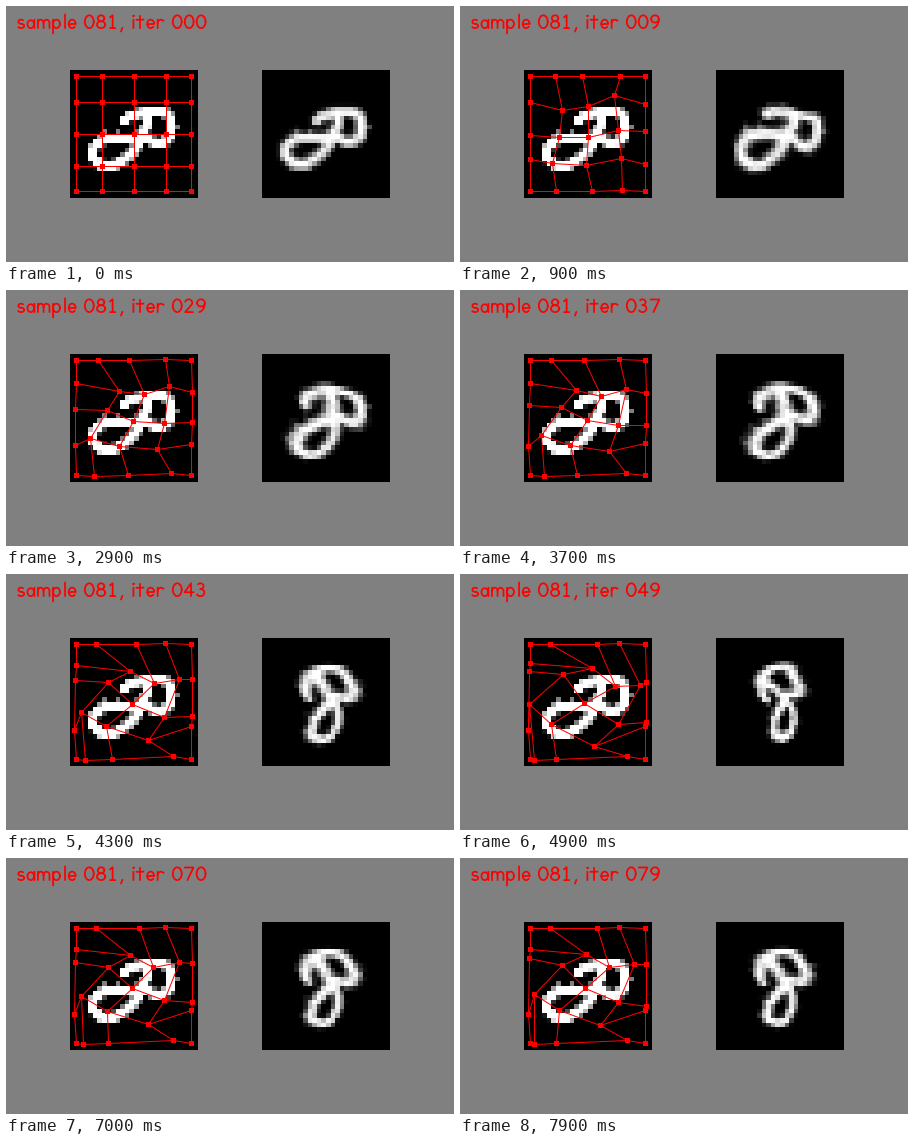
A matplotlib script that plays this animation: 448 by 256 pixels, repeating every 8000 ms.

```python
import numpy as np
import matplotlib.pyplot as plt
from matplotlib.animation import FuncAnimation
from matplotlib.collections import LineCollection, PolyCollection

W, H, DPI = 448, 256, 64
PX = 72 / DPI
FRAMES, INTERVAL = 80, 100
N, BOX = 28, 128
RED = "#ff0000"


# ---- strokes ----
def line(*pts):
    return np.array(pts, float)


def arc(cx, cy, rx, ry, start=0, end=360):
    t = np.radians(np.linspace(start, end, 33))
    return np.column_stack([cx + rx * np.cos(t), cy + ry * np.sin(t)])


def curve(*pts):
    """Catmull-Rom spline through the points."""
    p = np.array([pts[0], *pts, pts[-1]], float)
    t = np.linspace(0, 1, 9)[:, None]
    return np.concatenate([
        0.5 * (2 * b + (c - a) * t + (2 * a - 5 * b + 4 * c - d) * t**2
               + (3 * b - a - 3 * c + d) * t**3)
        for a, b, c, d in zip(p, p[1:], p[2:], p[3:])])


def stem(x, top=9.5, foot=0.9):
    return line((x, top), (x, foot))


def arch(x, w):
    return np.vstack([arc(x + w / 2, 6, w / 2, 3.4, 180, 0), line((x + w, 0.9))])


# ---- round pen lettering, 20 units per em, y up from the baseline ----
SIX = [arc(6, 4.6, 3.9, 3.7), arc(9, 4.6, 6.9, 9.4, 180, 100)]
GLYPHS = {
    " ": [],
    ",": [line((3.4, 1.2), (2, -2.6))],
    "s": [arc(4.9, 7.4, 2.7, 2.1, 40, 270), arc(4.9, 3.1, 3.2, 2.2, 90, -150)],
    "a": [arc(4.9, 4.9, 3.4, 4), stem(8.6)],
    "m": [stem(1.8), arch(1.8, 5.7), arch(7.5, 6)],
    "p": [stem(1.8, foot=-4.6), arc(5.3, 5.2, 3.5, 4.3)],
    "l": [stem(3.4, 14.8)],
    "e": [line((2, 4.9), (8.9, 5.2)), arc(5.4, 5.2, 3.5, 4.3, 0, 320)],
    "i": [stem(3.4), arc(3.4, 13.3, 0.3, 0.3)],
    "t": [stem(4.6, 13.4), line((0.9, 9.3), (8.2, 9.5))],
    "r": [stem(1.8), arc(5.2, 6, 3.4, 3.4, 180, 40)],
    "0": [arc(6.1, 7.4, 4.5, 6.5)],
    "1": [line((2.9, 11.8), (5.6, 14), (5.6, 0.9)), line((3, 0.9), (8.2, 0.9))],
    "2": [np.vstack([arc(5.6, 10.4, 3.6, 3.5, 165, -35), line((2, 0.9), (10, 0.9))])],
    "3": [arc(5.4, 11, 3.2, 2.9, 140, -90), arc(5.4, 4.5, 4, 3.6, 90, -150)],
    "4": [line((10.6, 4.8), (1.4, 4.8), (8, 14), (8, 0.9))],
    "5": [line((9.6, 13.7), (3.8, 13.7), (3.1, 7.8)), arc(5.6, 4.8, 3.9, 3.9, 130, -150)],
    "6": SIX,
    "7": [line((1.6, 13.7), (10.4, 13.7), (4.4, 0.9))],
    "8": [arc(6, 10.9, 3.3, 3), arc(6, 4.4, 4.2, 3.5)],
    "9": [(12, 14.8) - s for s in SIX],
}


def advance(ch):
    if ch.isdigit():
        return 12.1
    return max((s[:, 0].max() for s in GLYPHS[ch]), default=4.2) + 1.8


def write(text, x, y, size):
    """Strokes of a line of text with its baseline at (x, y)."""
    k, out = size / 20, []
    for ch in text:
        out += [(x, y) + s * (k, -k) for s in GLYPHS[ch]]
        x += k * advance(ch)
    return out


# ---- the handwritten eight, 28 x 28 ----
def make_digit():
    pen = np.concatenate([
        curve((55, 50), (63, 45), (78, 42), (93, 42), (100, 48), (101, 58),
              (99, 67), (92, 72), (82, 71), (74, 66)),
        curve((78, 44), (77, 54), (73, 62), (66, 69)),
        curve((72, 68), (56, 68), (36, 69), (26, 75), (23, 85), (30, 94),
              (43, 95), (55, 89), (65, 79), (72, 68)),
    ]) * N / BOX - 0.5
    row, col = np.mgrid[:N, :N]
    d = np.hypot(col[..., None] - pen[:, 0], row[..., None] - pen[:, 1]).min(-1)
    img = np.clip((1.4 - d) / 0.6, 0, 1)
    for r, c in ((11, 11), (13, 7), (13, 10), (12, 23)):
        img[r, c] = max(img[r, c], 0.5)
    return img


# ---- control grid, in stage pixels ----
TIMES = (0, 9, 21, 37, 49, 61, 79)
TURN = (0, .04, .27, .48, 1, .66, .78)
SLIDE = (0, -.13, .03, .35, 1, .6, 1)
REST = np.stack(np.meshgrid(*[[70, 96, 128, 160, 185]] * 2), -1).astype(float)


def grid_at(it):
    turn = np.interp(it, TIMES, TURN)
    slide = np.interp(it, TIMES, SLIDE)
    start = 1 - np.exp(-it / 3)
    drift = min(it / 40, 1)
    g = REST.copy()

    # inner points: a turn plus bends, as a polynomial over the 3 x 3 block
    v, u = np.mgrid[-1:2, -1:2]
    uu, vv = u * u - 2 / 3, v * v - 2 / 3
    g[1:4, 1:4, 0] += (
        start * (4.4 * u * v - 2 * u - 1.5 * vv + u * vv - 0.5)
        + turn * (6 * uu - 2 * u - 29 * v + 5 * v * uu))
    g[1:4, 1:4, 1] += (
        start * (2.3 * u * v - 5.9 * u - 2.5 * v - 4.2 * uu - 2 * vv - v * uu - u * vv - 0.5)
        + turn * (24 * u - 7 * v + 4 * u * v + 4 * vv + 6.5 * v * uu - 9.5 * u * vv))

    # border points slide along their edge and bow outwards a little
    g[0, 1:4, 0] += -5.5 * drift, 22 * slide - 13 * drift, -drift
    g[4, 1:4, 0] += -14 * slide - 8 * drift, -32 * slide, 7 * drift
    g[1:4, 0, 1] += -7 * turn, -15 * turn - 16 * slide, 4 * drift - 8 * start
    g[1:4, 4, 1] += 10 * turn + 2 * start, 20 * slide, -8 * drift
    g[2:4, 0, 0] -= drift, 1.7 * drift
    g[1:3, 4, 0] += drift
    g[0, 3, 1] -= drift
    g[4, 1:4, 1] += drift, 0, -2.7 * drift
    return g


# ---- thin plate spline ----
def radial(a, b):
    r2 = ((a[:, None] - b[None]) ** 2).sum(-1)
    return 0.5 * r2 * np.log(np.where(r2 > 0, r2, 1))


def affine(p):
    return np.column_stack([np.ones(len(p)), p])


def lattice(v):
    x, y = np.meshgrid(v, v)
    return np.column_stack([x.ravel(), y.ravel()])


KNOTS = lattice(np.array([-0.9, -0.48, 0, 0.48, 0.9]))
PIXELS = lattice(np.linspace(-1, 1, N))
system = np.block([[radial(KNOTS, KNOTS), affine(KNOTS)],
                   [affine(KNOTS).T, np.zeros((3, 3))]])
BASIS = np.hstack([radial(PIXELS, KNOTS), affine(PIXELS)]) @ np.linalg.inv(system)[:, :25]

DIGIT = make_digit()
PADDED = np.pad(DIGIT, 2)


def sample(x, y):
    x, y = np.clip(x + 2, 0, N + 2), np.clip(y + 2, 0, N + 2)
    i, j = x.astype(int), y.astype(int)
    u, v = x - i, y - j
    return ((1 - v) * ((1 - u) * PADDED[j, i] + u * PADDED[j, i + 1])
            + v * ((1 - u) * PADDED[j + 1, i] + u * PADDED[j + 1, i + 1]))


def warp(grid):
    src = BASIS @ ((grid.reshape(-1, 2) + 0.5 - 128) / 64)
    x, y = ((src + 1) / 2 * (N - 1)).T
    soft = 0.22
    img = (sample(x - soft, y - soft) + sample(x + soft, y + soft)) / 2
    return img.reshape(N, N)


# ---- stage ----
fig = plt.figure(figsize=(W / DPI, H / DPI), dpi=DPI, facecolor="#808080")
ax = fig.add_axes([0, 0, 1, 1])
ax.axis("off")


def panel(img, x, y=64):
    return ax.imshow(img, cmap="gray", vmin=0, vmax=1, interpolation="nearest",
                     aspect="auto", extent=(x, x + BOX, y + BOX, y))


def layer(artist):
    artist.set_snap(False)
    return ax.add_collection(artist, autolim=False)


panel(DIGIT, 64)
warped = panel(DIGIT, 256)
wires = layer(LineCollection([], colors=RED, linewidths=PX))
dots = layer(PolyCollection([], facecolors=RED, edgecolors="none"))
label = layer(LineCollection([], colors=RED, linewidths=1.75 * PX,
                             capstyle="round", joinstyle="round"))
ax.set_xlim(0, W)
ax.set_ylim(H, 0)
SQUARE = 2.5 * np.array([(-1, -1), (1, -1), (1, 1), (-1, 1)])


def update(it):
    grid = grid_at(it)
    warped.set_data(warp(grid))
    nodes = np.round(grid) + 0.5
    wires.set_segments([*nodes, *nodes.transpose(1, 0, 2)])
    dots.set_verts(nodes.reshape(-1, 1, 2) + SQUARE)
    label.set_segments(write(f"sample 081, iter {it:03d}", 10.2, 23, 19.7))
    return warped, wires, dots, label


anim = FuncAnimation(fig, update, frames=FRAMES, interval=INTERVAL,
                     init_func=lambda: update(0), repeat=True, repeat_delay=0)
plt.show()
```
